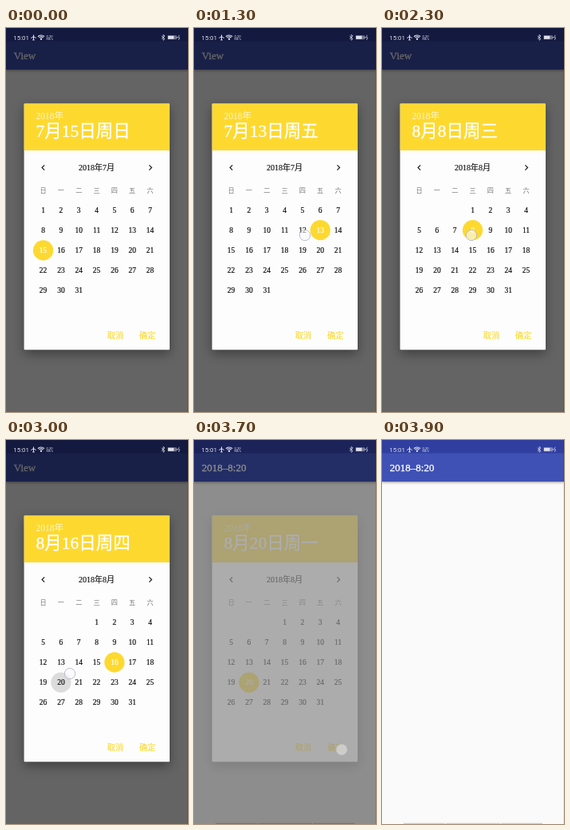
Animation, 228 px wide and 480 px high, one loop 4900 ms. Source, as an HTML page with a canvas:

```html
<!DOCTYPE html>
<html lang="zh-CN">
<head>
<meta charset="utf-8">
<title>日期选择</title>
<style>
html, body { margin: 0; width: 100%; height: 100%; overflow: hidden; background: #666; }
canvas { display: block; width: 228px; height: 480px; }
</style>
</head>
<body>
<canvas id="stage"></canvas>
<script>
const W = 228, H = 480, LOOP = 4900, STEP = 100;
const SERIF = '"Liberation Serif", "Noto Sans CJK SC", "Noto Sans CJK", serif';
const SANS = 'Roboto, sans-serif';
const YELLOW = '#fdd930';
const WEEK = '日一二三四五六';
const PANEL = { x: 22.6, y: 94.5, w: 182.4, h: 307.8 };
const PAGE = 182;
const MONTHS = { 7: { first: 0, days: 31 }, 8: { first: 3, days: 31 } };

// Each track lists [start ms, value]; a value holds until the next entry.
const SELECTED = [[0, [7, 15]], [700, [7, 10]], [1300, [7, 13]], [2300, [8, 8]], [2600, [8, 16]], [3100, [8, 20]]];
const PRESSED = [[0, null], [600, [7, 10]], [700, null], [1200, [7, 13]], [1300, null],
  [2200, [8, 8]], [2300, null], [2500, [8, 16]], [2600, null], [2800, [8, 20]], [3100, null]];
const TOUCH = [[0, null], [500, [94, 259]], [800, null], [1100, [139, 259]], [1400, null],
  [1600, [165, 284]], [1700, [72, 260]], [1800, null], [2200, [112, 259]], [2400, null],
  [2500, [137, 284]], [2700, null], [2800, [80, 292]], [3200, null], [3600, [185, 387]], [3800, null]];
const SCROLL = [[0, 0], [1700, 25], [1800, 98], [1900, 156], [2000, 178], [2100, PAGE]];
const DIM = [[0, .6], [3700, .44], [3800, .2], [3900, 0]];
const FADE = [[0, 1], [3700, .28], [3800, .06], [3900, 0]];

const at = (track, t) => track.filter(([start]) => start <= t).pop()[1];
const column = i => 46.6 + i * 22.32;
const row = i => 227.5 + i * 25.2;

const canvas = document.getElementById('stage');
const ratio = window.devicePixelRatio || 1;
canvas.width = W * ratio;
canvas.height = H * ratio;
const c = canvas.getContext('2d');

function rect(x, y, w, h, color) {
  c.fillStyle = color;
  c.fillRect(x, y, w, h);
}

function disc(x, y, r, color) {
  c.fillStyle = color;
  c.beginPath();
  c.arc(x, y, r, 0, Math.PI * 2);
  c.fill();
}

function line(points, color, width) {
  c.strokeStyle = color;
  c.lineWidth = width;
  c.beginPath();
  points.forEach(([x, y]) => c.lineTo(x, y));
  c.stroke();
}

function shadow(color, blur, offset) {
  c.shadowColor = color;
  c.shadowBlur = blur * ratio;
  c.shadowOffsetY = offset * ratio;
}

function text(value, x, y, size, color, { align = 'left', font = SERIF, bold = 0, weight = 400 } = {}) {
  c.font = `${weight} ${size}px ${font}`;
  c.textAlign = align;
  c.fillStyle = color;
  c.fillText(value, x, y);
  if (bold) {
    c.strokeStyle = color;
    c.lineWidth = bold;
    c.strokeText(value, x, y);
  }
}

function drawApp(t) {
  rect(0, 0, W, H, '#fafafa');
  c.save();
  shadow('rgba(0,0,0,.4)', 3, 1);
  rect(0, 0, W, 52, '#3f51b5');
  c.restore();
  rect(0, 0, W, 16.5, '#303f9f');
  text(t < 3600 ? 'View' : '2018–8:20', 9.8, 38.6, 13, '#fff', { bold: .3 });
  if (t >= 3700) [[27, 52], [80, 68], [149, 52]].forEach(([x, w]) => rect(x, 478.8, w, 1.2, '#ccc'));
  rect(W - 1, 0, 1, H, 'rgba(0,0,0,.1)');
}

function drawStatus() {
  const color = '#dfe0ea';
  text('15:01', 9.3, 15, 7.9, color, { font: SANS });
  // Airplane
  line([[34.5, 8.5], [34.5, 15]], color, 1.1);
  line([[31.3, 12.6], [34.5, 10.7], [37.7, 12.6]], color, 1);
  line([[33, 15], [36, 15]], color, .8);
  // Wireless
  [5.5, 3.5].forEach(r => {
    c.strokeStyle = color;
    c.lineWidth = 1.2;
    c.beginPath();
    c.arc(44, 14.5, r, -Math.PI * .76, -Math.PI * .24);
    c.stroke();
  });
  disc(44, 13.7, 1.2, color);
  text('0.20', 50.5, 11.6, 4.2, color, { font: SANS });
  text('KB/s', 50.5, 15, 3.9, color, { font: SANS });
  // Bluetooth, battery, charging bolt
  line([[194.8, 10], [199, 13.6], [197, 15.3], [197, 8.3], [199, 10], [194.8, 13.6]], color, .75);
  rect(202.5, 9.3, 11.2, 5, 'rgba(223,224,234,.45)');
  rect(203, 9.8, 7.2, 4, color);
  rect(213.7, 10.8, .9, 2, color);
  line([[217, 8.8], [215.8, 12], [217.5, 12], [216.3, 15]], color, .7);
}

function drawMonth(month, selected, pressed) {
  const { first, days } = MONTHS[month];
  text(`2018年${month}月`, 113.6, 177.6, 10, '#111', { align: 'center', bold: .15 });
  [...WEEK].forEach((name, i) => text(name, column(i), 206.2, 8.2, '#777', { align: 'center' }));
  for (let day = 1; day <= days; day++) {
    const cell = first + day - 1;
    const x = column(cell % 7), y = row(Math.floor(cell / 7));
    const is = mark => mark && mark[0] === month && mark[1] === day;
    if (is(pressed)) disc(x, y, 12.6, '#dcdcdc');
    if (is(selected)) disc(x, y, 12.6, YELLOW);
    text(day, x, y + 3, 9.5, is(selected) ? '#fff' : '#111', { align: 'center', bold: .2 });
  }
}

function drawDialog(t) {
  const { x, y, w, h } = PANEL;
  const selected = at(SELECTED, t), pressed = at(PRESSED, t), scroll = at(SCROLL, t);
  const [month, day] = selected;
  const weekday = WEEK[(MONTHS[month].first + day - 1) % 7];

  c.save();
  shadow('rgba(0,0,0,.38)', 14, 5);
  c.fillStyle = '#fdfdfd';
  c.beginPath();
  c.roundRect(x, y, w, h, 1);
  c.fill();
  c.restore();

  c.save();
  c.beginPath();
  c.roundRect(x, y, w, h, 1);
  c.clip();
  rect(x, y, w, 58.5, YELLOW);
  text('2018年', 37.6, 114, 11.5, 'rgba(255,255,255,.75)');
  text(`${month}月${day}日周${weekday}`, 37.6, 135.8, 21.5, '#fff', { bold: .3 });

  [[7, -scroll], [8, PAGE - scroll]].forEach(([m, offset]) => {
    if (Math.abs(offset) >= PAGE) return;
    c.save();
    c.translate(offset, 0);
    drawMonth(m, selected, pressed);
    c.restore();
  });

  line([[48.2, 171.4], [45.1, 174.5], [48.2, 177.6]], '#222', 1.25);
  line([[179.4, 171.4], [182.5, 174.5], [179.4, 177.6]], '#222', 1.25);
  text('取消', 126.7, 387.6, 10.2, YELLOW, { weight: 500, bold: .15 });
  text('确定', 167, 387.6, 10.2, YELLOW, { weight: 500, bold: .15 });
  c.restore();
}

function drawTouch([x, y], t) {
  const onButton = t >= 3600;
  disc(x, y, 6.6, onButton ? 'rgba(220,220,220,.7)' : 'rgba(250,250,253,.6)');
  c.strokeStyle = onButton ? 'rgba(200,200,204,.6)' : 'rgba(178,180,198,.85)';
  c.lineWidth = 1;
  c.beginPath();
  c.arc(x, y, 6.7, 0, Math.PI * 2);
  c.stroke();
}

// The dialog is painted on its own layer so its overlapping parts fade as one.
const layer = document.createElement('canvas');
layer.width = canvas.width;
layer.height = canvas.height;

function draw(t) {
  const fade = at(FADE, t), touch = at(TOUCH, t);
  c.setTransform(ratio, 0, 0, ratio, 0, 0);
  c.clearRect(0, 0, W, H);
  if (fade) {
    drawDialog(t);
    const copy = layer.getContext('2d');
    copy.clearRect(0, 0, layer.width, layer.height);
    copy.drawImage(canvas, 0, 0);
  }
  drawApp(t);
  rect(0, 0, W, H, `rgba(0,0,0,${at(DIM, t)})`);
  drawStatus();
  c.globalAlpha = fade;
  if (fade) c.drawImage(layer, 0, 0, W, H);
  c.globalAlpha = 1;
  if (touch) drawTouch(touch, t);
}

const start = performance.now();
function tick() {
  const elapsed = (performance.now() - start) % LOOP;
  draw(Math.floor(elapsed / STEP) * STEP);
  requestAnimationFrame(tick);
}
tick();
</script>
</body>
</html>
```
